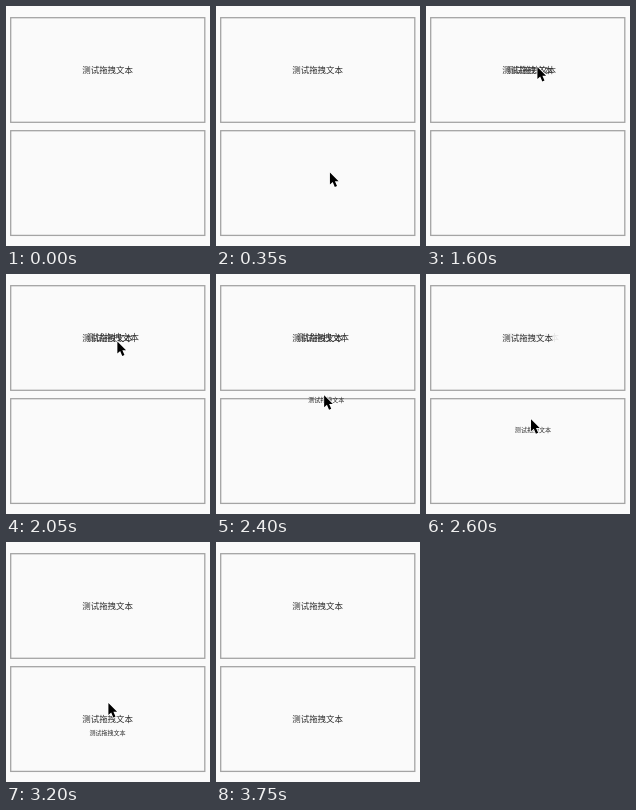
Recreate the animation shown at these times as an HTML page. Size 204 by 240 pixels, loop 4500 ms.

```html
<!DOCTYPE html>
<html lang="zh">
<head>
<meta charset="utf-8">
<style>
  html, body { margin: 0; width: 100%; height: 100%; overflow: hidden; background: #fafafa; }
  svg { display: block; width: 100%; height: 100%; }
  text { font: 8.45px "Noto Sans CJK SC", "Noto Sans CJK", "Noto Sans", sans-serif; fill: #2c2c2c; text-anchor: middle; }
  rect { fill: none; stroke: #a4a4a4; stroke-width: 1.3; }
</style>
</head>
<body>
<svg viewBox="0 0 204 240">
  <rect x="4.7" y="11.7" width="194.1" height="104.6"/>
  <rect x="4.7" y="124.7" width="194.1" height="104.7"/>
  <text x="101.6" y="67.1">测试拖拽文本</text>
  <text id="ghost" y="3.1">测试拖拽文本</text>
  <text id="dropped" x="101.6" y="180.1">测试拖拽文本</text>
  <text id="preview" y="3.1">测试拖拽文本</text>
  <g id="cursor" stroke-linejoin="round">
    <path id="arrow" d="M0 0V12L2.8 9.5L4.9 14.5L7.1 13.5L5 8.7H8.7Z"
          fill="#000" stroke="#fff" stroke-width="1.5" paint-order="stroke"/>
  </g>
</svg>
<script>
const LOOP = 4500, STEP = 50;
const [ghost, dropped, preview, cursor] =
  ["ghost", "dropped", "preview", "cursor"].map(id => document.getElementById(id));

const span = (t, start, end) => Math.min(1, Math.max(0, (t - start) / (end - start)));
const mix = (a, b, u) => a + (b - a) * u;
const smooth = u => u * u * (3 - 2 * u);
const easeIn = u => u * u;
const easeOut = u => u * (2 - u);

function place(el, x, y, scale, alpha) {
  el.setAttribute("transform", `translate(${x} ${y}) scale(${scale})`);
  el.setAttribute("opacity", alpha);
}

function drawCursor(t) {
  const enter = smooth(span(t, 150, 700));
  const drag = smooth(span(t, 1985, 2915) ** 0.7);
  const leave = easeIn(span(t, 3200, 3750));
  const x = mix(115, 111.4, enter) - 9 * drag * drag + leave;
  const y = mix(212, 61, enter) + 100 * drag + 82 * leave;
  place(cursor, x, y, 1, t >= 150 && t < 3750 ? 1 : 0);
}

function drawText(t) {
  const grow = mix(0.97, 1.03, smooth(span(t, 1600, 2100)));
  const half = 25.2 * grow;
  place(ghost, 81 + half, 64, grow, t < 1600 ? 0 : 1 - smooth(span(t, 2400, 2650)));

  const fall = easeOut(span(t, 2100, 3150));
  const seen = span(t, 2050, 2200) - span(t, 3200, 3450);
  place(preview, mix(113, 101.5, fall * fall), mix(64, 191, fall), 0.715, seen);
  dropped.setAttribute("opacity", smooth(span(t, 2900, 3200)));
}

function tick() {
  const t = Math.floor(performance.now() % LOOP / STEP) * STEP;
  drawText(t);
  drawCursor(t);
  requestAnimationFrame(tick);
}
tick();
</script>
</body>
</html>
```
